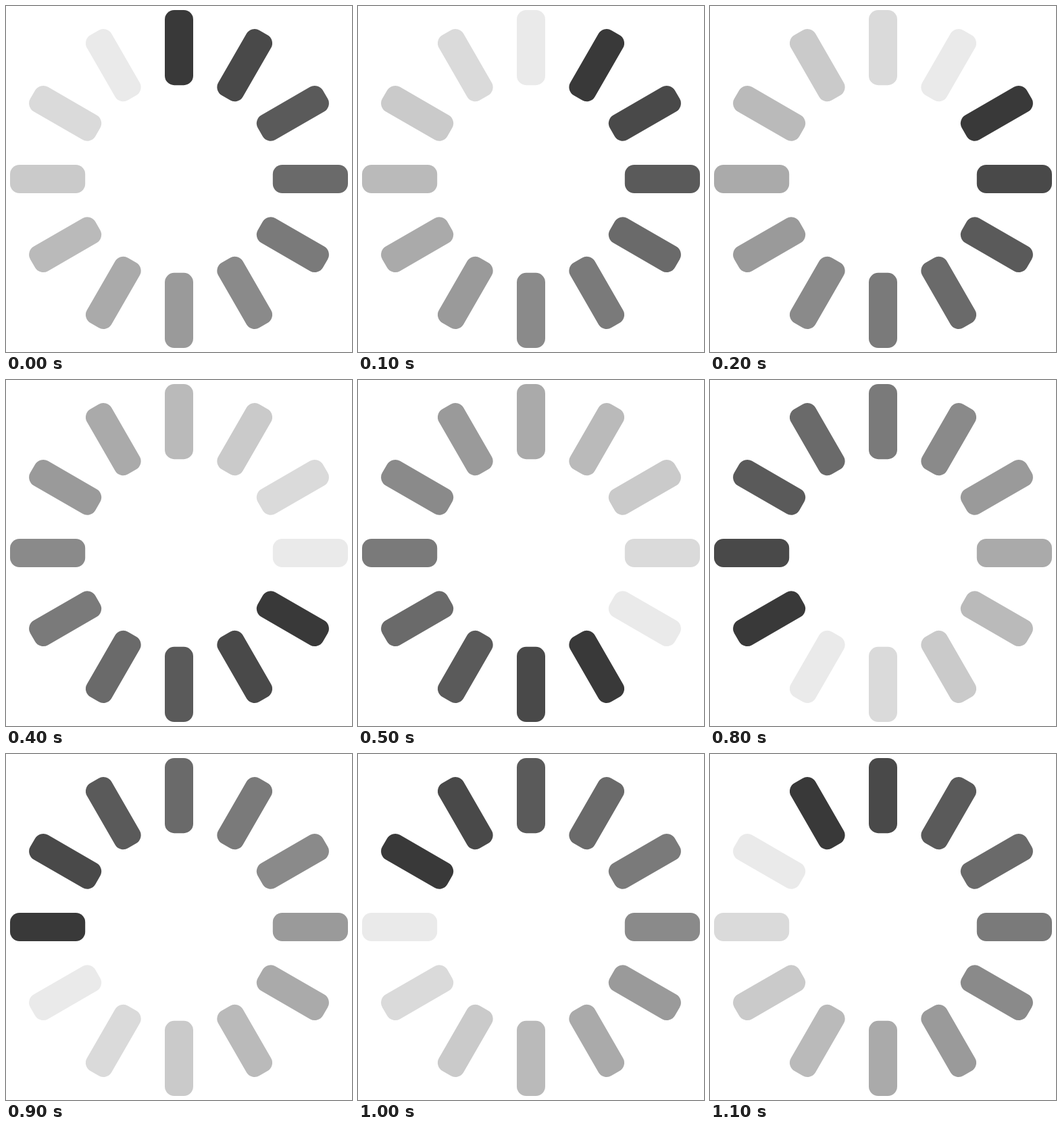
These frames come from a looping animation (512 px wide and 512 px high, 1200 ms). An HTML page:

```html
<!DOCTYPE html>
<html lang="en">
<head>
<meta charset="utf-8">
<title>Loading spinner</title>
<style>
  html, body { margin: 0; width: 100%; height: 100%; overflow: hidden; background: #fff; }
  svg { display: block; width: 100%; height: 100%; }
</style>
</head>
<body>
<svg id="spinner" viewBox="0 0 512 512"></svg>
<script>
const BARS = 12;
const STEP_MS = 100;
const SVG_NS = 'http://www.w3.org/2000/svg';
const spinner = document.getElementById('spinner');

function makeBar(index) {
  const bar = document.createElementNS(SVG_NS, 'rect');
  const attributes = {
    x: 235, y: 6, width: 42, height: 111.2, rx: 14,
    transform: `rotate(${index * 360 / BARS} 256 256)`
  };
  for (const [name, value] of Object.entries(attributes)) bar.setAttribute(name, value);
  return spinner.appendChild(bar);
}

const bars = Array.from({ length: BARS }, (_, index) => makeBar(index));

// The darkest bar leads; shades lighten clockwise from it.
function render(time) {
  const lead = Math.floor(time / STEP_MS) % BARS;
  bars.forEach((bar, index) => {
    const distance = (index - lead + BARS) % BARS;
    const gray = Math.round(57.4 + 16.05 * distance);
    bar.setAttribute('fill', `rgb(${gray},${gray},${gray})`);
  });
}

const start = performance.now();
function tick() {
  render(performance.now() - start);
  requestAnimationFrame(tick);
}
tick();
</script>
</body>
</html>
```
